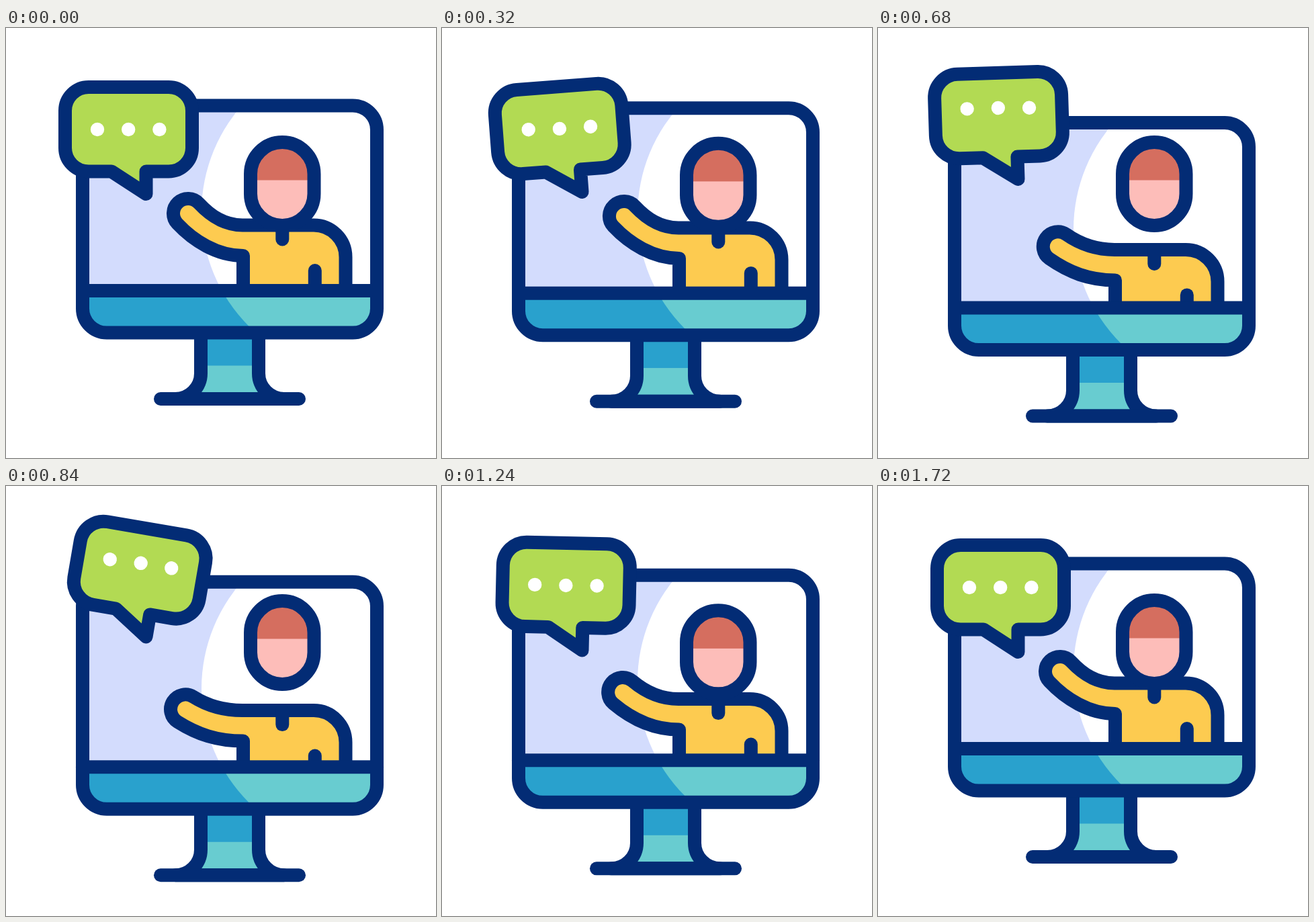
An HTML page with a canvas that plays this animation: 640x640 px, repeating every 1.76 s.

```html
<!DOCTYPE html>
<html lang="en">
<head>
<meta charset="utf-8">
<title>Video call</title>
<style>
  html, body { margin: 0; width: 100%; height: 100%; overflow: hidden; background: #fff; }
  canvas { display: block; width: 100vw; height: 100vh; }
</style>
</head>
<body>
<canvas id="stage" width="640" height="640"></canvas>
<script>
const ctx = document.getElementById('stage').getContext('2d');
const LOOP = 1760;
const NAVY = '#032c75', BLUE = '#29a1cd', TEAL = '#68ccd0', LAVENDER = '#d3dcfd';
const GREEN = '#b2da53', YELLOW = '#fdcb50', RED = '#d56e5f', PINK = '#fdbdb9', WHITE = '#fff';

// Cubic in-out ease from 0 to 1 between two moments
function ease(t, from, to) {
  const u = Math.min(1, Math.max(0, (t - from) / (to - from)));
  return u < 0.5 ? 4 * u ** 3 : 1 - 4 * (1 - u) ** 3;
}

const pulse = (t, riseFrom, riseTo, fallFrom, fallTo) =>
  Math.min(ease(t, riseFrom, riseTo), 1 - ease(t, fallFrom, fallTo));

function group(x, y, draw) {
  ctx.save();
  ctx.translate(x, y);
  draw();
  ctx.restore();
}

function rect(color, x, y, w, h) {
  ctx.fillStyle = color;
  ctx.fillRect(x, y, w, h);
}

function disc(color, x, y, r) {
  ctx.fillStyle = color;
  ctx.beginPath();
  ctx.arc(x, y, r, 0, Math.PI * 2);
  ctx.fill();
}

function roundBox(x, y, w, h, r) {
  const path = new Path2D();
  path.roundRect(x, y, w, h, r);
  return path;
}

function shape(path, fill) {
  if (fill) {
    ctx.fillStyle = fill;
    ctx.fill(path);
  }
  ctx.stroke(path);
}

const line = d => ctx.stroke(new Path2D(d));

function drawStand() {
  const legs = 'M290 454V514A38 38 0 0 1 252 552H414A38 38 0 0 1 376 514V454';
  ctx.save();
  ctx.clip(new Path2D(legs));
  rect(BLUE, 240, 450, 190, 53);
  rect(TEAL, 240, 502.5, 190, 60);
  ctx.restore();
  line(legs);
  line('M230 552H436');
}

const frame = roundBox(114, 115.5, 438, 338, 36);

function drawScreen() {
  ctx.save();
  ctx.clip(frame);
  rect(LAVENDER, 104, 105, 460, 286);
  disc(WHITE, 531, 274, 240);
  ctx.beginPath();
  ctx.rect(104, 391, 460, 70);
  ctx.clip();
  rect(BLUE, 104, 391, 460, 70);
  disc(TEAL, 531, 274, 240);
  ctx.restore();
}

function drawHead() {
  const head = roundBox(364, 170, 94.5, 124, 47.25);
  ctx.save();
  ctx.clip(head);
  rect(PINK, 360, 165, 104, 135);
  rect(RED, 360, 165, 104, 61.5);
  ctx.restore();
  shape(head);
}

function drawBody(drop) {
  const handX = 271 - 4 * drop, handY = 276 + 16 * drop, r = 22;
  const angle = (47 - 15 * drop) * Math.PI / 180;
  const c = Math.cos(angle), s = Math.sin(angle);
  const lowX = handX - r * s, lowY = handY + r * c;
  const topX = handX + r * s, topY = handY - r * c;
  const body = new Path2D();
  body.moveTo(353, 470);
  body.lineTo(353, 339);
  body.bezierCurveTo(314, 339, lowX + 35 * c, lowY + 35 * s, lowX, lowY);
  body.arc(handX, handY, r, angle + Math.PI / 2, angle - Math.PI / 2);
  body.bezierCurveTo(topX + 26 * c, topY + 26 * s, 325, 293.5, 352, 293.5);
  body.lineTo(458, 293.5);
  body.arc(458, 341, 47.5, -Math.PI / 2, 0);
  body.lineTo(505.5, 470);
  shape(body, YELLOW);
  line('M411.3 293.5V314.5');
  line('M459.8 470V361');
}

const bubble = new Path2D('M123 88H242A35 35 0 0 1 277 123V178.500A35 35 0 0 1 242 213.500' +
  'H208.500V247L157 213.500H123A35 35 0 0 1 88 178.500V123A35 35 0 0 1 123 88Z');

function drawBubble(t) {
  const lift = 22.7 * pulse(t, 79, 829, 767, 1445);
  const tilt = -6 * ease(t, 40, 515) + 16.4 * ease(t, 515, 930) - 10.4 * ease(t, 905, 1395);
  group(208.5, 247 - lift, () => {
    ctx.rotate(tilt * Math.PI / 180);
    ctx.translate(-208.5, -247);
    shape(bubble, GREEN);
    for (let i = 0; i < 3; i++) {
      const peak = 640 + 100 * i;
      const hop = 11 * pulse(t, peak - 520, peak, peak, peak + 520);
      disc(WHITE, 136 + 46.2 * i, 151 - hop, 10.2);
    }
  });
}

function draw(t) {
  const sink = 27.3 * pulse(t, 46, 896, 858, 1708);
  const headLift = 26.3 * pulse(t, 150, 809, 802, 1399);
  const drop = pulse(t, 210, 950, 880, 1584);

  rect(WHITE, 0, 0, 640, 640);
  ctx.strokeStyle = NAVY;
  ctx.lineWidth = 20;
  ctx.lineCap = ctx.lineJoin = 'round';

  group(0, sink, () => {
    drawStand();
    drawScreen();
    ctx.save();
    ctx.beginPath();
    ctx.rect(114, 115, 438, 276);
    ctx.clip();
    group(0, 13.5 * drop, () => drawBody(drop));
    group(0, -headLift, drawHead);
    ctx.restore();
    line('M114 391H552');
    shape(frame);
  });
  drawBubble(t);
}

function tick() {
  draw(performance.now() % LOOP);
  requestAnimationFrame(tick);
}
tick();
</script>
</body>
</html>
```
